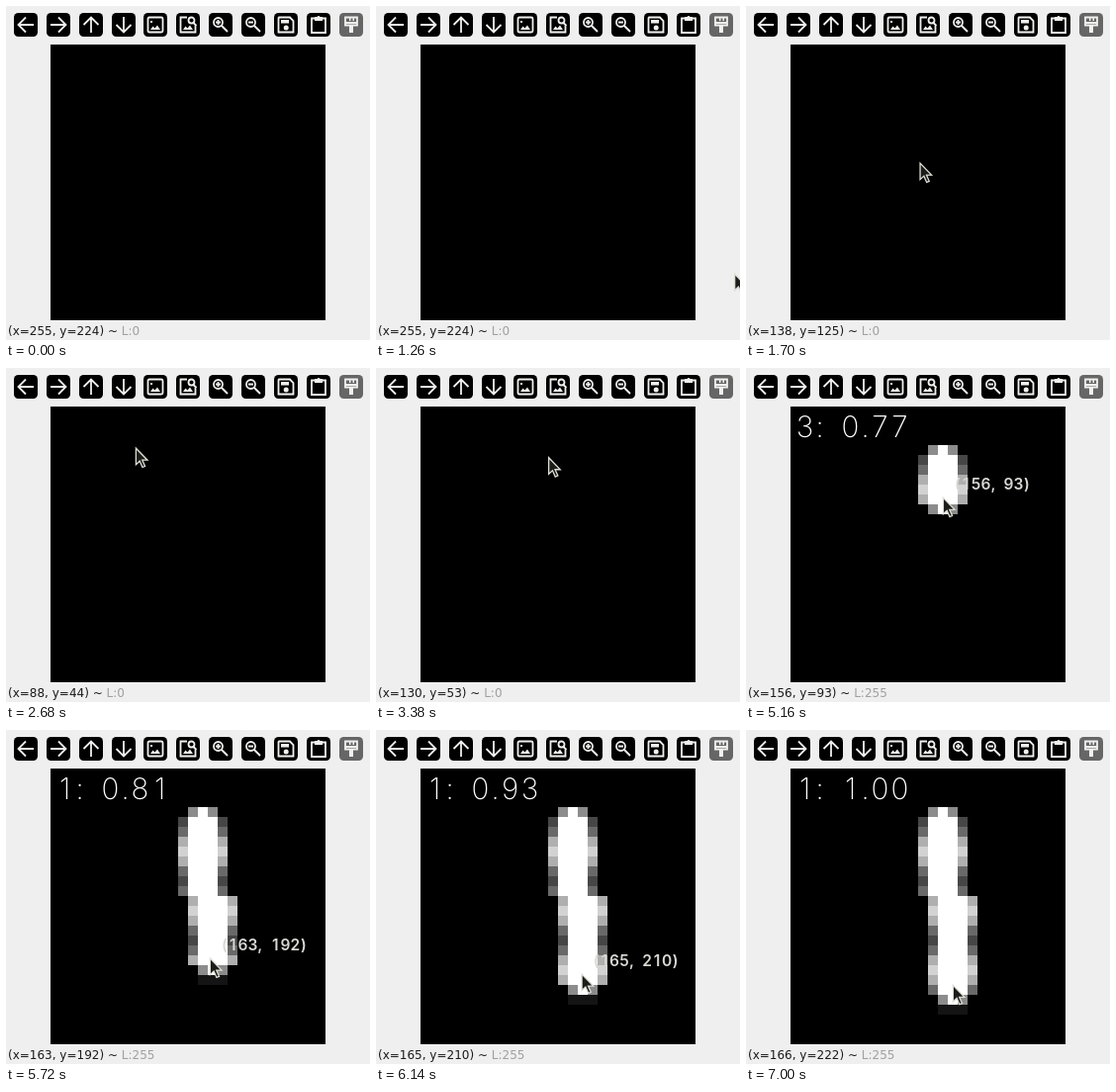
An HTML page for the animation above (8 s loop, 368 px wide and 338 px high).

```html
<!DOCTYPE html>
<html lang="en">
<head>
<meta charset="utf-8">
<title>Digit drawing</title>
<style>
html, body { margin: 0; width: 100%; height: 100%; overflow: hidden; background: #efefef; }
svg { display: block; }
#tools g { fill: none; stroke: #f0f0ee; stroke-width: 1.8; }
#tools .solid { fill: #f0f0ee; stroke: none; }
#tools .box { stroke: none; fill: #000; }
#tools .off .box { fill: #666; }
#guess, #spot { text-anchor: middle; font-family: Inter, Roboto, sans-serif; }
#guess { font-size: 29.5px; font-weight: 200; fill: #fff; }
#spot { font-size: 15.5px; font-weight: 600; fill: #d8d8d4; }
#status { font: 12px "DejaVu Sans", sans-serif; fill: #1c1c1c; white-space: pre; }
#level { fill: #a0a0a0; }
</style>
</head>
<body>
<svg width="368" height="338" viewBox="0 0 368 338">
  <rect width="368" height="338" fill="#efefef"/>
  <g id="tools"></g>
  <rect x="45" y="39" width="278" height="279"/>
  <g id="cells" shape-rendering="crispEdges"></g>
  <text id="guess"></text>
  <text id="spot"></text>
  <path id="arrow" d="M0 0V16.5L3.8 13L6.6 19.3L9.2 18.2L6.4 12H11.6Z" fill="#1c1c1a" stroke="#deded6" stroke-width="1.3"/>
  <text id="status" x="2" y="333" xml:space="preserve"><tspan id="place"></tspan><tspan id="level"></tspan></text>
</svg>
<script>
const LOOP = 8000, STEP = 20, LAG = 12, PRESS = 4560, RELEASE = 6560, CLEAR = 7000;
const SCALE = 278 / 280;
const $ = id => document.getElementById(id);
const clamp = v => Math.max(0, Math.min(1, v));

function add(parent, tag, attrs) {
  const el = document.createElementNS('http://www.w3.org/2000/svg', tag);
  for (const k in attrs) el.setAttribute(k, attrs[k]);
  return parent.appendChild(el);
}

// Toolbar: outline, filled part and turn of each 24 px icon
const arrow = 'M20 12H5M12 4.5L4.5 12L12 19.5';
const frame = 'M6 4.5H18Q19.5 4.5 19.5 6V18Q19.5 19.5 18 19.5H6Q4.5 19.5 4.5 18V6Q4.5 4.5 6 4.5Z';
const hills = 'M7 17L9.5 13.5L11.5 15.5L14 12.5L17 17Z';
const lens = 'M5 9.5a4.5 4.5 0 1 0 9 0a4.5 4.5 0 1 0 -9 0M13 13L19 19M7 9.5H12';
const icons = [
  [arrow], [arrow, '', 180], [arrow, '', 90], [arrow, '', 270],
  [frame, hills + 'M7 8h2v2h-2Z'],
  ['M11 4.5H4.5V19.5H19.5V13M12.5 7.5a3 3 0 1 0 6 0a3 3 0 1 0 -6 0M17.5 10L20.5 13', hills],
  [lens + 'M9.5 7V12'],
  [lens],
  ['M5 4.5H16L19.5 8V19.5H4.5V5Z', 'M7 7h8v3.5h-8ZM9.7 15a2.5 2.5 0 1 0 5 0a2.5 2.5 0 1 0 -5 0'],
  ['M5 5.5H19V20H5Z', 'M8 4h2.5a1.6 1.6 0 0 1 3 0H16V8H8Z'],
  ['M6 4.5H18V12.5H6ZM6 10H18', 'M10 13h4v7h-4ZM10 5h1.5v3h-1.5ZM13.5 5h1.5v3h-1.5Z']
];
icons.forEach(([line, solid, turn = 0], i) => {
  const g = add($('tools'), 'g', { transform: `translate(${Math.round(8 + i * 32.85)} 7)` });
  if (i === icons.length - 1) g.setAttribute('class', 'off');
  add(g, 'rect', { class: 'box', width: 24, height: 24, rx: 4.5 });
  add(g, 'path', { d: line, transform: `rotate(${turn} 12 12)` });
  if (solid) add(g, 'path', { d: solid, class: 'solid' });
});

// Pointer key points: time, x and y on the 280 px drawing
const track = [
  [1240, 329, 240], [1700, 132.5, 122], [1980, 101, 79], [2080, 101, 79],
  [2680, 87.5, 43.5], [2820, 87, 48], [2920, 87, 48], [3640, 156, 56],
  [PRESS, 156, 56], [5160, 156, 94], [5720, 163, 194.5], [6440, 166, 222]
];
function at(t) {
  const i = track.findIndex(p => p[0] > t);
  if (i === 0) return track[0].slice(1);
  if (i < 0) return track[track.length - 1].slice(1);
  const [t0, x0, y0] = track[i - 1], [t1, x1, y1] = track[i];
  const k = (t - t0) / (t1 - t0);
  return [x0 + (x1 - x0) * k, y0 + (y1 - y0) * k];
}

// The stroke on a coarse grid: white core, edges that swell and thin
const FIRST = 4, BEND = 13, COL = 13;
const cells = [];
for (let row = FIRST; row < 25; row++) {
  for (let col = COL; col < COL + 6; col++) {
    const el = add($('cells'), 'rect', { x: 44 + col * 10, y: 38 + row * 10, width: 10, height: 10 });
    cells.push({ row, col, el });
  }
}
function shade(row, col, last) {
  const d = Math.abs(col - (row < BEND ? 15 : 16));
  if (d > 2 || row > last + 1) return 0;
  if (row > last) return d < 2 && row > BEND ? 20 : 0;
  if (row === FIRST || row === last) return [255, 140, 0][d];
  return d < 2 ? 255 : Math.round(140 + 70 * Math.cos((row - 8) * Math.PI / 3));
}

// Each character sits centred in its own plotter-style advance
const advance = { ':': 10, '.': 10, ',': 10, ' ': 16, '(': 14, ')': 14 };
function plot(el, str, x, y, size) {
  const xs = [];
  for (const ch of str) {
    const w = (advance[ch] || 20) * size;
    xs.push((x + w / 2).toFixed(2));
    x += w;
  }
  el.setAttribute('x', xs.join(' '));
  el.setAttribute('y', y);
  el.textContent = str;
}

// A short stroke reads as 3, a long one as 1
function guess(y) {
  return y < 110
    ? '3: ' + (0.77 - Math.abs(y - 93) / 100).toFixed(2)
    : '1: ' + (1 - (222 - y) * 0.0062).toFixed(2);
}

function draw(t) {
  const [x, y] = at(t);
  const seen = at(t - LAG);
  const [px, py] = seen[0] < 280 ? seen.map(Math.round) : [255, 224];
  const down = t >= PRESS;
  const tipX = 44.5 + x * SCALE, tipY = 38 + y * SCALE;

  $('arrow').setAttribute('transform', `translate(${tipX} ${tipY})`);
  $('place').textContent = `(x=${px}, y=${py}) ~ `;
  $('level').textContent = 'L:' + (down ? 255 : 0);

  const last = Math.floor((py + 13) / 10);
  for (const { row, col, el } of cells) {
    const v = down ? shade(row, col, last) : 0;
    el.setAttribute('fill', `rgb(${v},${v},${v})`);
  }

  plot($('guess'), down ? guess(py) : '', 49.5, 70, 1);
  plot($('spot'), down ? `(${px}, ${py})` : '', tipX + 11, tipY - 8, 0.5);
  $('spot').setAttribute('opacity', clamp((CLEAR - t) / (CLEAR - RELEASE)));
}

const start = performance.now();
function tick() {
  const t = (performance.now() - start) % LOOP;
  draw(Math.floor(t / STEP) * STEP);
  requestAnimationFrame(tick);
}
tick();
</script>
</body>
</html>
```
